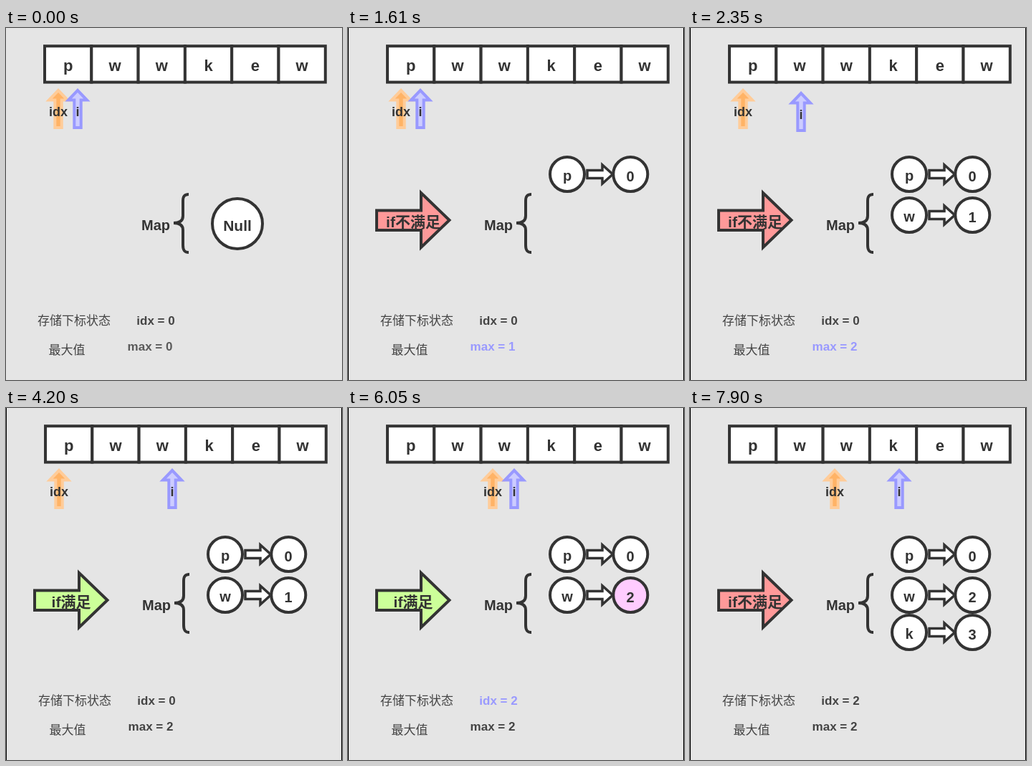
These frames come from a looping animation (469 px wide and 491 px high, 8000 ms). An HTML page:

```html
<!DOCTYPE html>
<html lang="zh">
<head>
<meta charset="utf-8">
<title>Sliding window</title>
<style>
html, body { margin: 0; width: 100%; height: 100%; overflow: hidden; background: #e5e5e5; }
svg { display: block; width: 469px; height: 491px; }
text { font: bold 17px "Liberation Sans", Arial, "Noto Sans CJK SC", "Noto Sans CJK", sans-serif; fill: #333; text-anchor: middle; }
.line { stroke: #333; stroke-width: 4; fill: #fff; }
.thin { stroke-width: 3.5; }
</style>
</head>
<body>
<svg id="stage" viewBox="0 0 469 491"></svg>
<script>
const NS = "http://www.w3.org/2000/svg";
const stage = document.getElementById("stage");
const LILAC = "#9999ff", DARK = "#444", INK = "#333";

function add(parent, tag, attrs, text) {
  const el = document.createElementNS(NS, tag);
  for (const k in attrs) el.setAttribute(k, attrs[k]);
  if (text !== undefined) el.textContent = text;
  parent.appendChild(el);
  return el;
}

function label(parent, x, y, size, text, style = "") {
  return add(parent, "text", { x, y, style: `font-size:${size}px;${style}` }, text);
}

const show = (el, on) => el.setAttribute("visibility", on ? "visible" : "hidden");
const move = (el, x, y) => el.setAttribute("transform", `translate(${x} ${y})`);

add(stage, "rect", { width: 469, height: 491, fill: "#e5e5e5" });
const edges = add(stage, "path", { d: "M.5 0V491M468.5 0V491", stroke: "#000" });
const scene = add(stage, "g", {});

// Letter cells
const CELL = 65.3;
[..."pwwkew"].forEach((ch, i) => {
  const x = 55 + i * CELL;
  add(scene, "rect", { x, y: 25.2, width: CELL, height: 50.4, class: "line" });
  label(scene, x + CELL / 2, 59.5, 22, ch);
});

// Pointers
function pointer(fill, stroke) {
  return add(scene, "path", {
    d: "M0 87L13 100.5H4.7V139H-4.7V100.5H-13Z", fill, stroke, "stroke-width": 4
  });
}
const idxArrow = pointer("#ffb366", "#ffcc99");
const iArrow = pointer("#ccccff", LILAC);
const idxName = label(scene, 0, 123, 18, "idx");
const iName = label(scene, 0, 123, 18, "i");

// Condition arrow
const branch = add(scene, "g", {});
const branchShape = add(branch, "path", {
  d: "M40 254.5H102V230L141.5 268L102 306V282H40Z", class: "line"
});
const branchText = label(branch, 91, 278, 21, "");

// Map
label(scene, 210, 282, 20, "Map");
add(scene, "path", {
  d: "M256 232C250 232 248 235 248 241V262C248 269 243 272 235 272C243 272 248 275 248 282V303C248 310 250 313 256 313",
  class: "line", style: "fill:none"
});

const empty = add(scene, "g", {});
add(empty, "circle", { cx: 324, cy: 273, r: 35, class: "line" });
label(empty, 324, 283, 21, "Null");

const rows = [["p", 204], ["w", 261], ["k", 313]].map(([key, y]) => {
  const g = add(scene, "g", {});
  add(g, "circle", { cx: 306, cy: y, r: 24, class: "line" });
  const ring = add(g, "circle", { cx: 394.3, cy: y, r: 24, class: "line" });
  add(g, "path", {
    d: `M334 ${y - 5.5}H355V${y - 13}L369.5 ${y}L355 ${y + 13}V${y + 5.5}H334Z`,
    class: "line thin"
  });
  label(g, 306, y + 9, 20, key);
  return { g, ring, value: label(g, 394, y + 9.5, 20, "") };
});

// Status lines
label(scene, 96, 413.5, 17, "存储下标状态", "font-weight:400;fill:#444");
label(scene, 86, 454.5, 17, "最大值", "font-weight:400;fill:#444");
const idxLine = label(scene, 210, 414, 17, "");
const maxLine = label(scene, 202, 450, 17, "");

// ok: null hides the condition arrow
const steps = [
  { at: 0, idx: 0, idxX: 74, iX: 101, ok: null, map: [], max: 0, maxFill: "#5a5a5a" },
  { at: 500, idx: 0, idxX: 74, iX: 101, ok: false, map: [0], max: 1, maxFill: LILAC },
  { at: 2350, idx: 0, idxX: 74, iX: 155, iY: 4, ok: false, map: [0, 1], max: 2, maxFill: LILAC },
  { at: 4200, idx: 0, idxX: 74, iX: 232, ok: true, map: [0, 1], max: 2 },
  { at: 6050, idx: 2, idxX: 202, iX: 232, ok: true, map: [0, 2], max: 2, idxFill: LILAC, hot: 1 },
  { at: 7900, idx: 2, idxX: 202, iX: 292, ok: false, map: [0, 2, 3], max: 2 }
];
const LOOP = 8000;
let current;

function draw(t) {
  const s = steps.filter(step => step.at <= t).pop();
  if (s === current) return;
  current = s;
  const started = s.ok !== null;
  show(edges, started);
  show(empty, !started);
  show(branch, started);
  move(scene, started ? 0 : -1, 0);
  for (const el of [idxArrow, idxName]) move(el, s.idxX, 0);
  for (const el of [iArrow, iName]) move(el, s.iX, s.iY || 0);
  branchShape.style.fill = s.ok ? "#ccff99" : "#ff9999";
  branchText.textContent = s.ok ? "if满足" : "if不满足";
  rows.forEach((row, i) => {
    show(row.g, i < s.map.length);
    row.value.textContent = s.map[i] ?? "";
    row.ring.style.fill = s.hot === i ? "#ffccff" : "#fff";
  });
  idxLine.textContent = `idx = ${s.idx}`;
  idxLine.style.fill = s.idxFill || DARK;
  maxLine.textContent = `max = ${s.max}`;
  maxLine.style.fill = s.maxFill || DARK;
}

const start = performance.now();
function tick() {
  draw((performance.now() - start) % LOOP);
  requestAnimationFrame(tick);
}
draw(0);
requestAnimationFrame(tick);
</script>
</body>
</html>
```
